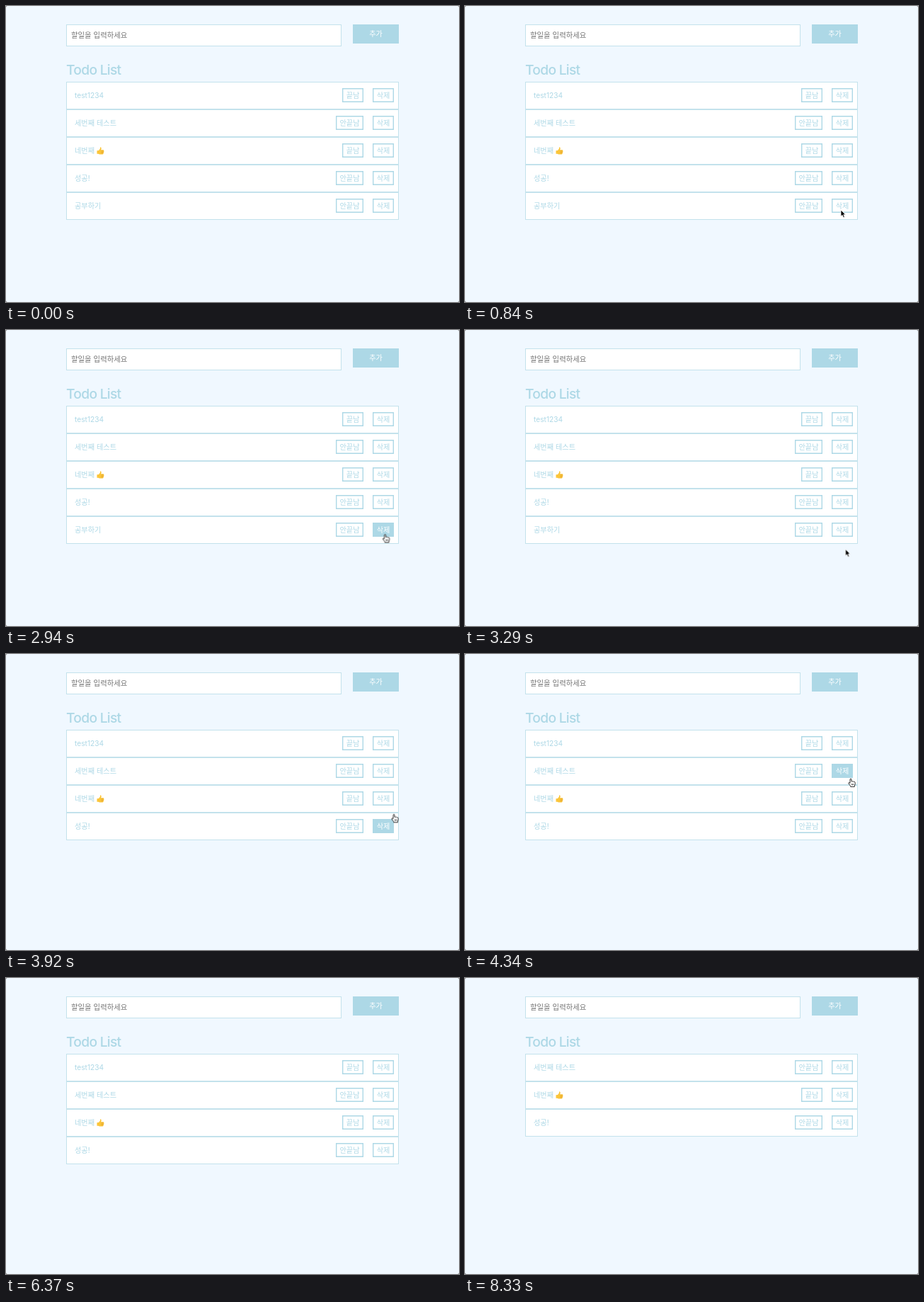
Animation, 640 px wide and 418 px high, one loop 8470 ms. Source, as an HTML page:

```html
<!DOCTYPE html>
<html lang="ko">
<head>
<meta charset="utf-8">
<title>Todo List</title>
<style>
  :root { --blue: #add8e6; --line: #c3e2ec; --loop: 8470ms; }
  * { box-sizing: border-box; }
  html, body { margin: 0; width: 100%; height: 100%; overflow: hidden; background: #777; }
  body { position: relative; font: 10.2px Inter, 'Noto Sans CJK KR', 'Noto Sans CJK', sans-serif; color: var(--blue); }
  .page { position: absolute; inset: 0; background: #f0f8ff; border-radius: 2px; overflow: hidden; }
  .page > * { position: absolute; }

  .field { left: 85px; top: 26px; width: 389px; height: 31px; padding-left: 6px; line-height: 29px;
    background: #fff; border: 1px solid var(--line); color: #757575; font-size: 10.4px; }
  .add { left: 490px; top: 26px; width: 65px; height: 27px; line-height: 26px; text-align: center;
    background: var(--blue); color: #fff; }
  h1 { left: 85px; top: 77px; margin: 0; font-size: 19.3px; font-weight: 500; line-height: 26px; letter-spacing: -.75px; }

  ul { left: 85px; top: 107px; width: 470px; margin: 0; padding: 0; list-style: none; }
  li { position: relative; height: 39px; padding-left: 11px; line-height: 37px; background: #fff;
    border: 1px solid var(--line); overflow: hidden; white-space: pre; }
  b { position: absolute; top: 8px; height: 20px; line-height: 20px; text-align: center; font-weight: 400;
    box-shadow: inset 0 0 0 1.4px var(--blue); }
  .state { right: 49px; width: 30px; }
  .state.open { width: 39px; }
  .del { right: 6px; width: 30px; }
  .thumb { width: 11px; height: 11px; vertical-align: -2px; }

  .first, .last, .del, .arrow, .hand, .cursor { animation: var(--loop) step-end infinite; }
  .first { animation-name: collapse; }
  .last { animation-name: vanish; }
  li:nth-child(1) .del { animation-name: hover1; }
  li:nth-child(2) .del { animation-name: hover2; }
  li:nth-child(4) .del { animation-name: hover4; }
  li:nth-child(5) .del { animation-name: hover5; }

  @keyframes collapse { 82.64% { height: 0; border-width: 0; } 100% { height: 0; border-width: 0; } }
  @keyframes vanish { 41.32%, 100% { visibility: hidden; } }
  @keyframes hover1 { 67.76% { background: var(--blue); color: #fff; } 71.9%, 100% { background: #fff; color: var(--blue); } }
  @keyframes hover2 { 51.23% { background: var(--blue); color: #fff; } 66.11%, 100% { background: #fff; color: var(--blue); } }
  @keyframes hover4 { 45.45% { background: var(--blue); color: #fff; } 47.1%, 100% { background: #fff; color: var(--blue); } }
  @keyframes hover5 { 20.66% { background: var(--blue); color: #fff; } 36.36%, 100% { background: #fff; color: var(--blue); } }

  .cursor { left: 0; top: 0; width: 1px; height: 1px; overflow: visible;
    animation-name: move, show; animation-timing-function: linear, step-end; }
  .arrow { animation-name: arrow; }
  .hand { animation-name: hand; }

  @keyframes show {
    0% { visibility: hidden; }
    .82% { visibility: visible; }
    75.2%, 100% { visibility: hidden; }
  }
  @keyframes arrow {
    0%, 36.36%, 47.1%, 66.11%, 71.9%, 100% { opacity: 1; }
    20.66%, 45.45%, 51.23%, 67.76% { opacity: 0; }
  }
  @keyframes hand {
    0%, 36.36%, 47.1%, 66.11%, 71.9%, 100% { opacity: 0; }
    20.66%, 45.45%, 51.23%, 67.76% { opacity: 1; }
  }
  @keyframes move {
    0%, .82% { transform: translate(508px, 351px); animation-timing-function: cubic-bezier(.3, .4, .5, 1); }
    9.9% { transform: translate(531px, 288px); }
    11.57% { transform: translate(531px, 288px); }
    13.22%, 20.6% { transform: translate(530.5px, 287.5px); }
    23.14%, 32.2% { transform: translate(535.5px, 288.5px); }
    34.71% { transform: translate(535.5px, 288.5px); }
    36.36% { transform: translate(536px, 296px); }
    39.67%, 43.8% { transform: translate(538px, 314px); }
    44.63% { transform: translate(541px, 288px); }
    45.45% { transform: translate(545px, 250px); }
    46.28% { transform: translate(548px, 226.5px); }
    47.93% { transform: translate(550px, 206px); }
    51.24% { transform: translate(545px, 176px); }
    54.55% { transform: translate(540.5px, 167.5px); }
    56.2%, 64.46% { transform: translate(540.5px, 166px); animation-timing-function: ease-in-out; }
    70.25%, 71.07% { transform: translate(536.5px, 127px); animation-timing-function: ease-in; }
    75.2%, 100% { transform: translate(512px, 353px); }
  }
</style>
</head>
<body>
<div class="page">
  <div class="field">할일을 입력하세요</div>
  <div class="add">추가</div>
  <h1>Todo List</h1>
  <ul>
    <li class="first">test1234<b class="state">끝남</b><b class="del">삭제</b></li>
    <li>세번째 테스트<b class="state open">안끝남</b><b class="del">삭제</b></li>
    <li>네번째 <svg class="thumb" viewBox="0 0 11 11"><path d="M.5 5.2 3 4.9 4.9 2.6 5 .8Q5.2 0 6 .4 7.1 1 6.6 3L6.3 4.2H9.6Q10.8 4.4 10.2 5.5 10.9 6.3 10.1 7.2 10.5 8.1 9.6 8.7 9.8 10.2 8.5 10.4H4.6Q3.2 10.3 2.6 9.7H.5Z" fill="#fbc53a"/><path d="M6.4 5.7H10M6.4 7.3H10M6.3 8.8H9.5" stroke="#d9942b" stroke-width=".5"/></svg><b class="state">끝남</b><b class="del">삭제</b></li>
    <li>성공!<b class="state open">안끝남</b><b class="del">삭제</b></li>
    <li class="last">공부하기<b class="state open">안끝남</b><b class="del">삭제</b></li>
  </ul>
  <svg class="cursor" stroke-linejoin="round">
    <path class="arrow" d="M0 0V9.2L2.1 7.3 3.7 10.9 5.3 10.2 3.8 6.7H6.6Z" fill="#000" stroke="#fff" stroke-width=".8"/>
    <g class="hand" stroke="#000" stroke-width=".8">
      <path d="M-1 1Q-.9 .1 0 .1T1 1V4Q1.8 3.3 2.7 4.2 3.6 3.5 4.4 4.5 6 4 6.2 5.6V7.6Q6 9 5.3 10V11.5H-.3V10.4Q-1.6 9-2.9 7 -3.5 5.9-2.7 5.6-1.9 5.4-1 6.4Z" fill="#fff"/>
      <path d="M1.2 7.2V9.4M2.6 7.2V9.4M4 7.2V9.4" fill="none" stroke-width=".6"/>
    </g>
  </svg>
</div>
</body>
</html>
```
